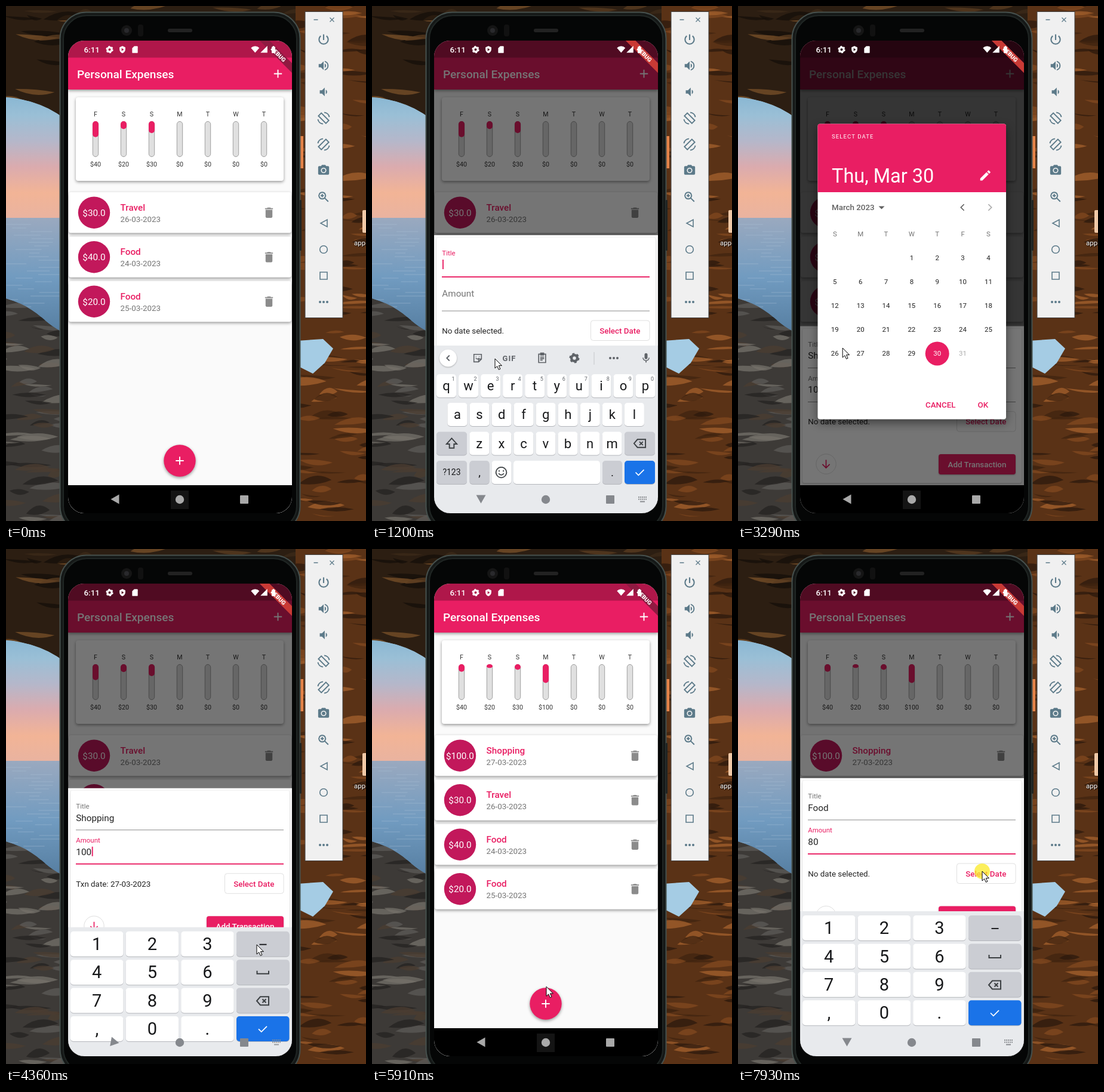
These frames come from a looping animation (603x863 px, 7.99 s). An HTML page:

```html
<!DOCTYPE html>
<html lang="en">
<head>
<meta charset="utf-8">
<title>Expenses app</title>
<style>
  html, body { margin: 0; width: 100%; height: 100%; overflow: hidden; background: #000; }
  svg { display: block; width: 100%; height: 100%; font-family: Roboto, sans-serif; }
  .low { filter: drop-shadow(0 1px 1px #0004); }
  .card { filter: drop-shadow(0 2px 2.5px #0006); }
  .high { filter: drop-shadow(0 6px 8px #0007); }
</style>
</head>
<body>
<svg id="stage" viewBox="0 0 603 863"></svg>
<script>
const LOOP = 7990, PINK = '#e91e63', GREY = '#757575', SLATE = '#5c7a89', KEY_INK = '#5f6368';
const MID = 'text-anchor="middle"', MEDIUM = 'font-weight="500"', MID_MEDIUM = MID + ' ' + MEDIUM;

// Drawing helpers
const rect = (x, y, w, h, fill, r = 0, extra = '') =>
  `<rect x="${x}" y="${y}" width="${w}" height="${h}" rx="${r}" fill="${fill}" ${extra}/>`;
const circle = (x, y, r, fill, extra = '') => `<circle cx="${x}" cy="${y}" r="${r}" fill="${fill}" ${extra}/>`;
const shape = (d, fill, extra = '') => `<path d="${d}" fill="${fill}" ${extra}/>`;
const stroke = (d, color, width = 1, extra = '') => shape(d, 'none', `stroke="${color}" stroke-width="${width}" ${extra}`);
const text = (x, middle, str, size, fill = '#222', extra = '') =>
  `<text x="${x}" y="${middle + size * .355}" font-size="${size}" fill="${fill}" ${extra}>${str}</text>`;
const group = (id, body = '', extra = '') => `<g id="${id}" ${extra}>${body}</g>`;
const place = (x, y, size, body) => `<g transform="translate(${x - size / 2} ${y - size / 2}) scale(${size / 24})">${body}</g>`;
const icon = (x, y, size, d, color, lineWidth) =>
  place(x, y, size, lineWidth ? stroke(d, color, lineWidth) : shape(d, color));
const plus = (x, y, color = '#fff') => stroke(`M${x - 6.7} ${y}h13.4M${x} ${y - 6.7}v13.4`, color, 1.9);
const gear = (x, y, r, color) =>
  circle(x, y, r * .58, 'none', `stroke="${color}" stroke-width="${r * .5}"`) +
  circle(x, y, r * .85, 'none', `stroke="${color}" stroke-width="${r * .3}" stroke-dasharray="${r * .445}"`);

const ICON = {
  trash: 'M6 19c0 1.1.9 2 2 2h8c1.1 0 2-.9 2-2V7H6zM19 4h-3.5l-1-1h-5l-1 1H5v2h14z',
  pencil: 'M3 17.25V21h3.75L17.8 9.94l-3.75-3.75zM20.7 7.04a1 1 0 0 0 0-1.4l-2.34-2.35a1 1 0 0 0-1.4 0l-1.84 1.83 3.75 3.75z',
  camera: 'M9 2L7.2 4H4a2 2 0 0 0-2 2v12a2 2 0 0 0 2 2h16a2 2 0 0 0 2-2V6a2 2 0 0 0-2-2h-3.2L15 2zM12 17a5 5 0 1 1 0-10 5 5 0 0 1 0 10zM12 15.2a3.2 3.2 0 1 0 0-6.4 3.2 3.2 0 0 0 0 6.4z',
  loud: 'M3 9v6h4l5 5V4L7 9zM16.5 12A4.5 4.5 0 0 0 14 8v8a4.5 4.5 0 0 0 2.5-4zM14 3.2v2.1a7 7 0 0 1 0 13.4v2.1a9 9 0 0 0 0-17.6z',
  quiet: 'M5 9v6h4l5 5V4L9 9zM18.5 12A4.5 4.5 0 0 0 16 8v8a4.5 4.5 0 0 0 2.5-4z',
  power: 'M12 3v10M7 5.9a8 8 0 1 0 10 0',
  zoom: 'M9.5 3.5a6 6 0 1 0 .01 0M14 14l6.5 6.5M9.5 6.5v6M6.5 9.5h6',
  rotate: 'M8 3L21 16L16 21L3 8zM13 2a10 10 0 0 1 9 8M11 22a10 10 0 0 1-9-8',
  shield: 'M12 1L3 5v6c0 5.5 3.8 10.7 9 12 5.2-1.3 9-6.5 9-12V5zM9.5 7.5l7 4.5-7 4.5z',
  sdCard: 'M18 2h-8L4 8v12a2 2 0 0 0 2 2h12a2 2 0 0 0 2-2V4a2 2 0 0 0-2-2z',
  wifi: 'M12 22L0 8a17 17 0 0 1 24 0z',
  signal: 'M2 22h20V2z',
  battery: 'M15.7 4H14V2h-4v2H8.3L7 5.3v15.4L8.3 22h7.4l1.3-1.3V5.3z',
  mic: 'M12 14a3 3 0 0 0 3-3V5a3 3 0 0 0-6 0v6a3 3 0 0 0 3 3zM17.3 11a5.3 5.3 0 0 1-10.6 0H5a7 7 0 0 0 6 6.7V21h2v-3.3a7 7 0 0 0 6-6.7z',
  erase: 'M8 5h14v14H8l-6-7zM11.5 9l6 6M17.5 9l-6 6',
  check: 'M4 12l5.5 5.5L20 7',
  shift: 'M12 3L3 13h5v7h8v-7h5z',
  sticker: 'M4 4h16v10l-6 6H4zM20 14h-6v6M8 9h1M15 9h1M8 12q4 4 7 0',
  clipboard: 'M5 4h14v17H5zM9 2h6v4H9zM8 10h8M8 13h8M8 16h5',
  smile: 'M12 2a10 10 0 1 0 .01 0M8 8v2.5M16 8v2.5M7 14q5 6 10 0',
  left: 'M15 6l-6 6 6 6',
  right: 'M9 6l6 6-6 6',
  down: 'M12 4v15M5 12.5l7 7 7-7'
};

// Landscape behind the phone
let seed = 7;
const random = () => (seed = seed * 16807 % 2147483647) / 2147483647;
function rock(id, outline, base, tones, count, [x0, y0, w, h]) {
  let streaks = '';
  for (let i = 0; i < count; i++) {
    const x = x0 + random() * w - 30, y = y0 + random() * h, len = 25 + random() * 50, thick = 3 + random() * 9, tilt = random() * 26 - 13;
    streaks += shape(`M${x} ${y}q${len / 2} ${tilt - thick} ${len} ${tilt / 2}q${-len / 2} ${thick} ${-len} ${-tilt / 2}`,
      tones[i % tones.length], 'opacity=".75"');
  }
  return `<clipPath id="${id}"><path d="${outline}"/></clipPath><g clip-path="url(#${id})">${shape(outline, base)}${streaks}</g>`;
}
const gradient = (id, ...stops) => `<linearGradient id="${id}" x2="0" y2="1">${stops.map((c, i) =>
  `<stop offset="${i / (stops.length - 1)}" stop-color="${c}"/>`).join('')}</linearGradient>`;
const landscape = gradient('sky', '#83b4d2', '#9abfd6', '#b5b7ca', '#dbabae', '#f2b496', '#e9b3a0') + gradient('sea', '#9aa9bf', '#719bc0', '#547c9f') +
  rect(0, 140, 100, 216, 'url(#sky)') + rect(0, 355, 100, 200, 'url(#sea)') +
  Array.from({ length: 24 }, (_, i) => stroke(`M${random() * 70 - 10} ${366 + i * 6}h${15 + random() * 40}`, '#a9c2d6', 1, 'opacity=".45"')).join('') +
  rock('arch', 'M0 0H603V60H100V190Q70 168 40 160T0 153Z', '#2c1e12', ['#5b3d20', '#150e08', '#7a5128', '#3c2a18'], 70, [0, 0, 600, 180]) +
  rock('shore', 'M0 490Q35 500 60 522T100 548V863H0Z', '#3d3a37', ['#5d5a57', '#242220', '#75706a', '#4b3d30'], 60, [0, 490, 110, 373]) +
  rock('cliff', 'M485 0H603V863H485Z', '#5a3216', ['#82481f', '#2b180c', '#a4602c', '#3f230f'], 130, [485, 0, 140, 863]) +
  rect(490, 218, 8, 54, '#e58349') + shape('M488 561L531 558L548 574L534 598L514 616L488 603Z', '#a5cce4') +
  rect(597, 342, 10, 38, '#f0c9a7', 2) + text(583, 397, 'app', 11.5, '#fff', 'style="text-shadow:1px 1px 1px #000"');

const phone = rect(90.5, 10.5, 402, 872, '#151817', 44, 'stroke="#46504d" stroke-width="2"') +
  rect(96, 16, 391, 861, '#050606', 39, 'stroke="#202624" stroke-width="2"') +
  rect(492, 325, 3, 85, '#202423', 1) + circle(202, 41, 9, '#151515') + circle(202, 41, 4, '#29292c') +
  rect(221, 31, 9, 20, '#111', 4) + rect(271, 38, 41, 6, '#222', 3);

const toolbar = rect(501, 9.5, 63, 513, '#f0f0f0', 0, 'stroke="#444"') +
  stroke('M515.5 23h7M542.5 19.5l7 7M549.5 19.5l-7 7', SLATE, 1.3) +
  icon(532, 56, 23, ICON.power, SLATE, 2.2) + icon(532, 100, 22, ICON.loud, SLATE) + icon(532, 144, 22, ICON.quiet, SLATE) +
  icon(532, 188, 23, ICON.rotate, SLATE, 2) +
  `<g transform="translate(1064 0) scale(-1 1)">${icon(532, 232, 23, ICON.rotate, SLATE, 2)}</g>` +
  icon(532, 275.5, 22, ICON.camera, SLATE) + icon(532, 320, 22, ICON.zoom, SLATE, 2.1) +
  stroke('M538 358v12l-11-6z', SLATE, 1.6) + circle(532, 408, 6.3, 'none', `stroke="${SLATE}" stroke-width="1.6"`) +
  stroke('M526 446h12v12h-12z', SLATE, 1.6) + [526, 532, 538].map(x => circle(x, 496, 2, SLATE)).join('');

// App screens
const DAYS = ['F', 'S', 'S', 'M', 'T', 'W', 'T'];
const ITEMS = [['Travel', 30, '26'], ['Food', 40, '24'], ['Food', 20, '25']];
function home(added) {
  const spent = [40, 20, 30, added ? 100 : 0, 0, 0, 0], total = added ? 190 : 90;
  const items = added ? [['Shopping', 100, '27'], ...ITEMS] : ITEMS;
  const bars = DAYS.map((day, i) => {
    const x = 150 + i * 47;
    return text(x, 181, day, 10.7, '#333', MID) + rect(x - 4.7, 193.5, 9.4, 59, '#e0e0e0', 4.7, 'stroke="#9e9e9e"') +
      (spent[i] ? rect(x - 5, 193, 10, spent[i] / total * 60, PINK, 5) : '') + text(x, 265, '$' + spent[i], 10.7, '#333', MID);
  }).join('');
  const cards = items.map(([name, amount, day], i) => {
    const y = 312 + i * 74.5;
    return rect(105, y, 373, 68.3, '#fff', 4, 'class="card"') + circle(147.5, y + 34.2, 26.7, '#c2185b') +
      text(147.5, y + 34.2, `$${amount}.0`, 15.28, '#fff', MID) + text(191.5, y + 25.3, name, 15.28, PINK, MEDIUM) +
      text(191.5, y + 45, day + '-03-2023', 13.37, GREY) + icon(440.5, y + 34.3, 22.9, ICON.trash, '#8b8b8b');
  }).join('');
  return rect(104, 58, 375, 792, '#fafafa') + rect(104, 58, 375, 82, PINK, 0, 'class="card"') + rect(104, 58, 375, 28.5, '#00000040') +
    text(119, 114, 'Personal Expenses', 19.1, '#fff', MEDIUM) + plus(455.5, 113.5) +
    rect(117, 153, 348, 140, '#fff', 4, 'class="card"') + bars + cards + circle(291, 762, 26.7, PINK, 'class="card"') + plus(291, 762);
}

const ruler = document.createElement('canvas').getContext('2d');
function field(y, label, value, focused, caret) {
  ruler.font = '15.28px Roboto, sans-serif';
  const floating = focused || value, x = 118 + ruler.measureText(value).width;
  return text(117.3, floating ? y : y + 11, label, floating ? 11.46 : 15.28, focused ? PINK : GREY) +
    text(117.3, y + 19.3, value, 15.28) + (caret && focused ? rect(x, y + 11, 1.9, 16, PINK) : '') +
    (focused ? rect(117, y + 39, 348, 1.9, PINK) : rect(117, y + 39.5, 348, 1, '#8a8a8a'));
}
// Drawn with the top edge of the sheet at y = 0
const form = s => rect(104, 0, 375, 520, '#fafafa') + rect(108, 4, 367, 259, '#fff', 4, 'class="low"') +
  field(30, 'Title', s.title, s.focus === 'title', s.caret) + field(87, 'Amount', s.amount, s.focus === 'amount', s.caret) +
  text(117.3, 160, s.dated ? 'Txn date: 27-03-2023' : 'No date selected.', 13.37) +
  rect(366.5, 143, 98.5, 33.5, '#fff', 4, 'stroke="#e0e0e0"') + text(415.3, 160, 'Select Date', 13.37, PINK, MID_MEDIUM) +
  circle(147.5, 231, 16.7, '#fff', 'stroke="#dedede"') + icon(147.5, 231, 21, ICON.down, PINK, 2) +
  rect(336, 214.5, 129, 34, PINK, 4, 'class="low"') + text(400.5, 231.5, 'Add Transaction', 13.37, '#fff', MID_MEDIUM);

function datePicker(selected) {
  const column = i => 162.3 + (i % 7) * 42.85;
  let days = [...'SMTWTFS'].map((d, i) => text(column(i), 382, d, 11.46, GREY, MID)).join('');
  for (let day = 1; day <= 31; day++) {
    const x = column(day + 2), y = 422 + Math.floor((day + 2) / 7) * 40.1, on = day === selected;
    if (on) days += circle(x, y, 20, PINK);
    else if (day === 30) days += circle(x, y, 19.5, 'none', `stroke="${PINK}"`);
    days += text(x, y, day, 11.46, on ? '#fff' : day === 30 ? PINK : day === 31 ? '#aaa' : '#222', MID);
  }
  return rect(104, 58, 375, 792, '#000', 0, 'opacity=".54"') + rect(133.5, 197.5, 315.5, 495, '#fff', 4, 'class="high"') +
    shape('M133.5 312V201.5a4 4 0 0 1 4-4h307.5a4 4 0 0 1 4 4V312z', PINK) +
    text(157, 218.3, 'SELECT DATE', 9.55, '#fff', 'letter-spacing="1.1"') +
    text(157, 284.5, selected === 30 ? 'Thu, Mar 30' : 'Mon, Mar 27', 32.5, '#fff') + icon(414.3, 284, 22.9, ICON.pencil, '#fff') +
    text(157, 337.7, 'March 2023', 13.37, '#616161', MEDIUM) + shape('M235.5 335.5h10l-5 5z', '#616161') +
    icon(376, 337.5, 21, ICON.left, '#616161', 2) + icon(422, 337.5, 21, ICON.right, '#aaa', 2) + days +
    text(339.3, 668, 'CANCEL', 13.37, PINK, MID_MEDIUM) + text(410.3, 668, 'OK', 13.37, PINK, MID_MEDIUM);
}

const DARK_KEY = '#cbcdd3', BLUE_KEY = '#1a73e8';
const key = (x, y, w, h, fill = '#fff', label = '', size = 22) => rect(x, y + 1, w, h, '#b4b6bb', 5) + rect(x, y, w, h, fill, 5) +
  text(x + w / 2, y + h / 2, label, size, '#17181a', MID);
function letterPad() {
  const row = (letters, x, y, hints) => [...letters].map((c, i) => key(x + i * 37.05, y, 33, 39, '#fff', c) +
    (hints ? text(x + i * 37.05 + 28, y + 7.5, (i + 1) % 10, 9, KEY_INK, MID) : '')).join('');
  return rect(104, 569, 375, 300, '#e8eaed') + circle(127.5, 590, 14.5, '#fff', 'class="low"') + icon(127.5, 590, 18, ICON.left, KEY_INK, 2.4) +
    icon(177, 590, 19, ICON.sticker, KEY_INK, 2) + text(230, 590, 'GIF', 13, KEY_INK, MID + ' font-weight="700" letter-spacing="1"') +
    icon(285, 590, 20, ICON.clipboard, KEY_INK, 2) + gear(339, 590, 8.5, KEY_INK) + rect(371.5, 580, 1, 21, '#c4c6ca') +
    [399, 405, 411].map(x => circle(x, 590, 2, KEY_INK)).join('') + icon(459, 590, 20, ICON.mic, KEY_INK) +
    row('qwertyuiop', 108, 617, true) + row('asdfghjkl', 126.5, 665) + row('zxcvbnm', 163.3, 713.5) +
    key(108, 713.5, 51, 39, DARK_KEY) + icon(133.5, 733, 23, ICON.shift, '#3c4043', 2) +
    key(423, 713.5, 51, 39, DARK_KEY) + icon(448.5, 733, 23, ICON.erase, '#3c4043', 2) +
    key(108, 762, 51, 39, DARK_KEY, '?123', 14) + key(163.5, 762, 33, 39, DARK_KEY, ',', 19) +
    key(200.5, 762, 33, 39) + icon(216.5, 781.5, 21, ICON.smile, '#3c4043', 2) + key(237, 762, 145, 39) +
    key(386, 762, 33, 39, DARK_KEY, '.', 19) + key(423, 762, 51, 39, BLUE_KEY) + icon(448.5, 781.5, 21, ICON.check, '#fff', 2);
}
function numberPad() {
  const rowY = i => 614 + i * 47.4;
  return rect(104, 607, 375, 260, '#e8eaed') +
    [...'123456789,0.'].map((c, i) => key(108 + i % 3 * 92.6, rowY(Math.floor(i / 3)), 88.5, 42, '#fff', c, 29)).join('') +
    [0, 1, 2, 3].map(i => key(386, rowY(i), 88.5, 42, i < 3 ? DARK_KEY : BLUE_KEY)).join('') +
    stroke('M424.5 636h12', '#202124', 2) + stroke('M420.5 680v5h19.5v-5', '#3c4043', 2) +
    icon(430, 730.5, 24, ICON.erase, '#3c4043', 2) + icon(430, 777.5, 21, ICON.check, '#fff', 2);
}

const ribbon = `<g transform="translate(479 58) rotate(45)">${rect(-45, 26.7, 90, 11.5, '#8f1a41')}` +
  group('brightRibbon', rect(-45, 26.7, 90, 11.5, '#c93a35')) + text(0, 32.5, 'DEBUG', 9.7, '#fff', MID + ' font-weight="900"') + '</g>';
const status = text(130.5, 73, '6:11', 13.4, '#fff', MEDIUM) + gear(173.5, 73, 6.2, '#fff') +
  place(195, 73, 13, shape(ICON.shield, '#fff', 'fill-rule="evenodd"')) + icon(216, 73, 14, ICON.sdCard, '#fff') +
  icon(417.3, 72.5, 14, ICON.wifi, '#fff') + icon(432, 72.5, 14, ICON.signal, '#fff') + icon(448, 73, 14.5, ICON.battery, '#fff');
const navIcons = group('back', shape('M-7 0L7 -8V8z', 'inherit')) + circle(291, 827, 7.2, 'inherit') + rect(392, 820, 14, 14, 'inherit', 1) +
  group('imeSwitch', stroke('M446 823h14M446 826.5h14', '#8b8e92', 2, 'stroke-dasharray="2 1"') + stroke('M449 830.5h8', '#8b8e92', 1.8));

document.getElementById('stage').innerHTML = landscape + phone + toolbar +
  `<clipPath id="screen"><rect x="104" y="58" width="375" height="792" rx="27"/></clipPath><g clip-path="url(#screen)">` +
  group('home') + group('scrim', rect(104, 58, 375, 792, '#000')) + group('sheet') + group('dialog') +
  rect(104, 803, 375, 47, '#000') + rect(276, 812, 30, 31, '#141414') + group('keyboard') + group('nav', navIcons) + ribbon + status + '</g>' +
  group('pointer', group('press', circle(0, 0, 13, '#fbe926', 'opacity=".75"')) +
    shape('M0 0V16L3.7 12.6L6.3 18.4L8.9 17.2L6.4 11.6H11.4z', '#fff', 'stroke="#000"'));

const parts = Object.fromEntries([...document.querySelectorAll('g[id]')].map(g => [g.id, g]));
const drawn = {};
function draw(id, html) {
  if (drawn[id] !== html) parts[id].innerHTML = drawn[id] = html;
}
const move = (id, x, y, rest = '') => parts[id].setAttribute('transform', `translate(${x} ${y}) ${rest}`);
const fade = (id, opacity) => parts[id].setAttribute('opacity', opacity);

// Timing
const progress = (t, a, b) => Math.min(1, Math.max(0, (t - a) / (b - a)));
const ease = (t, a, b) => 1 - (1 - progress(t, a, b)) ** 3;
const within = (t, a, b) => t >= a && t < b;
const typed = (t, word, start, step) => word.slice(0, Math.max(0, Math.floor((t - start) / step)));

const POINTER = [[70, 286, 782], [260, 286, 765], [470, 286, 765], [780, 206, 591], [1890, 206, 591], [2050, 210, 492],
  [2250, 210, 492], [2600, 416, 558], [3090, 416, 558], [3290, 175, 573], [3450, 203, 580], [3600, 203, 580], [3800, 420, 663],
  [4690, 420, 663], [4790, 430, 775], [5000, 430, 775], [5110, 400, 765], [5510, 400, 765], [5900, 292, 733], [5970, 292, 735],
  [6090, 206, 591], [6490, 206, 591], [6770, 414, 484], [7580, 409, 484], [7900, 409, 540]];
const CLICKS = [400, 800, 2070, 2830, 3540, 3880, 4800, 5110, 5930, 6100, 7040, 7920];

function pointerAt(t) {
  const next = POINTER.findIndex(p => p[0] > t);
  if (next < 1) return POINTER.at(next).slice(1);
  const [a, b] = [POINTER[next - 1], POINTER[next]], p = progress(t, a[0], b[0]);
  return [a[1] + (b[1] - a[1]) * p, a[2] + (b[2] - a[2]) * p];
}

function render(t) {
  const second = t >= 5450;
  const sheet = ease(t, 400, 620) - ease(t, 5150, 5400) + ease(t, 5965, 6090);
  const board = ease(t, 870, 1130) - ease(t, 3080, 3260) + ease(t, 4210, 4500) - ease(t, 4850, 5060) + ease(t, 6120, 6290);
  const dialog = progress(t, 3090, 3260) - progress(t, 3900, 4080);
  const numeric = within(t, 2150, 5450) || t >= 7180;
  const titleFocus = within(t, 860, 2080) || within(t, 6110, 7050);
  const amountFocus = within(t, 2080, 3080) || within(t, 4150, 4850) || t >= 7050;

  draw('home', home(t >= 5150));
  draw('sheet', form({
    title: second ? typed(t, 'Food', 6420, 70) : typed(t, 'Shopping', 1200, 52),
    amount: second ? typed(t, '80', 7510, 70) : typed(t, '100', 2330, 70),
    focus: titleFocus ? 'title' : amountFocus ? 'amount' : '',
    caret: t < 7790,
    dated: within(t, 3880, 5450)
  }));
  draw('dialog', datePicker(t < 3560 ? 30 : 27));
  draw('keyboard', numeric ? numberPad() : letterPad());

  fade('scrim', sheet * .54);
  fade('brightRibbon', sheet);
  move('sheet', 0, 803 - 266.5 * sheet - 152.5 * board);
  fade('dialog', dialog);
  move('keyboard', 0, (1 - board) * (numeric ? 243 : 281));
  parts.nav.setAttribute('fill', board > .3 ? '#85888d' : '#a9a9a9');
  move('back', 182.5, 826.5, `rotate(${270 * board ** 3})`);
  fade('imeSwitch', board);
  move('pointer', ...pointerAt(t));
  fade('pointer', t < 70 ? 0 : 1);
  fade('press', CLICKS.some(c => within(t, c, c + 90)) ? 1 : 0);
}

function frame() {
  render(performance.now() % LOOP);
  requestAnimationFrame(frame);
}
frame();
</script>
</body>
</html>
```
